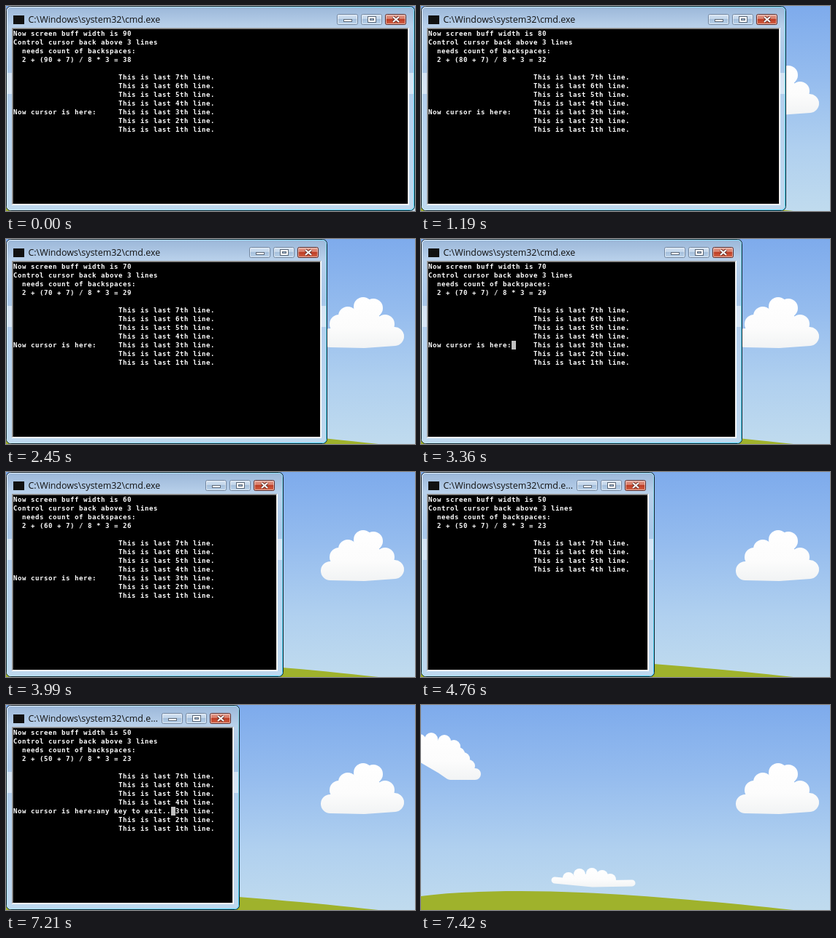
Animation of 560 by 282 pixels, one loop 8190 ms. Source, as an HTML page with a canvas:

```html
<!DOCTYPE html>
<html lang="en">
<head>
<meta charset="utf-8">
<title>Console cursor</title>
<style>
html, body { margin: 0; width: 100%; height: 100%; overflow: hidden; background: #000; }
canvas { display: block; }
</style>
</head>
<body>
<canvas id="stage" width="560" height="282"></canvas>
<script>
const ctx = document.getElementById('stage').getContext('2d');
const W = 560, H = 282, LOOP = 8190, CLOSE = 7420;
const TICK = 70, RUN = 17 * TICK, BLINK = 175;
const firstBlink = [140, 175, 280, 245, 245, 175]; // per run, in ms

function vertical(y0, y1, ...stops) {
  const g = ctx.createLinearGradient(0, y0, 0, y1);
  stops.forEach(([at, color]) => g.addColorStop(at, color));
  return g;
}

function rect(x, y, w, h, fill) {
  ctx.fillStyle = fill;
  ctx.fillRect(x, y, w, h);
}

function roundRect(x, y, w, h, r, fill, stroke) {
  ctx.beginPath();
  ctx.roundRect(x, y, w, h, r);
  if (fill) { ctx.fillStyle = fill; ctx.fill(); }
  if (stroke) { ctx.strokeStyle = stroke; ctx.lineWidth = 1; ctx.stroke(); }
}

function path(points) {
  ctx.beginPath();
  points.forEach(([x, y]) => ctx.lineTo(x, y));
}

// Round puffs on top of a thick base line
function cloud(top, bottom, r, puffs, baseR, base) {
  const fill = vertical(top, bottom, [0, '#fff'], [0.6, '#fcfcfc'], [1, '#f1f3f4']);
  ctx.fillStyle = ctx.strokeStyle = fill;
  path([...puffs, ...base]);
  ctx.fill();
  for (const [x, y] of puffs) {
    ctx.beginPath();
    ctx.arc(x, y, r, 0, Math.PI * 2);
    ctx.fill();
  }
  ctx.lineWidth = 2 * baseR;
  ctx.lineCap = ctx.lineJoin = 'round';
  path(base);
  ctx.stroke();
  ctx.lineCap = 'butt';
  ctx.lineJoin = 'miter';
}

function desktop() {
  rect(0, 0, W, H, vertical(0, H, [0, '#7eabec'], [0.35, '#95bcee'], [0.7, '#b0d0ef'], [1, '#c0dbee']));

  cloud(38, 104, 9, [[-2, 49], [14, 47], [32, 50], [45, 57], [51, 67], [58, 74], [65, 84]],
    8, [[74, 95], [40, 95], [27, 86], [-4, 68]]);
  cloud(80, 150, 13, [[456, 117], [468, 106], [489, 93], [503, 95], [519, 117]],
    13, [[532, 134], [490, 137], [444, 136]]);
  cloud(223, 251, 8, [[202, 238], [217, 233], [234, 232], [248, 235], [259, 240]],
    4.5, [[289, 245], [235, 246], [183, 241]]);

  ctx.fillStyle = '#9fb22c';
  ctx.beginPath();
  ctx.moveTo(0, 263);
  ctx.bezierCurveTo(50, 256, 140, 254, 220, 258);
  ctx.bezierCurveTo(310, 262, 420, 272, 510, H);
  ctx.lineTo(0, H);
  ctx.fill();
}

function button(x, fill, edge) {
  roundRect(x + 0.5, 11.5, 28, 14, 2, fill, edge);
  roundRect(x + 1.5, 12.5, 26, 12, 1, null, 'rgba(255,255,255,0.55)');
}

function buttons(w) {
  const glass = vertical(11, 26, [0, '#d8e5f4'], [0.48, '#c0d4e9'], [0.5, '#a5bfdb'], [1, '#bfd7ee']);
  const red = vertical(11, 26, [0, '#e6a698'], [0.48, '#d47460'], [0.5, '#bd3c24'], [1, '#d5694c']);
  const min = w - 107, max = w - 74, close = w - 41;
  button(min, glass, '#70859f');
  button(max, glass, '#70859f');
  button(close, red, '#5b2928');

  rect(min + 9, 18, 12, 4, '#5d6978');
  rect(min + 10, 19, 10, 2, '#fff');

  for (const [dark, light, width] of [['#5d6978', '#69362f', 4], ['#fff', '#fff', 2]]) {
    ctx.lineWidth = width;
    ctx.strokeStyle = dark;
    ctx.strokeRect(max + 11, 16, 8, 5);
    ctx.strokeStyle = light;
    for (const [y0, y1] of [[15, 22], [22, 15]]) {
      path([[close + 11, y0], [close + 19, y1]]);
      ctx.stroke();
    }
  }
}

function windowFrame(w) {
  roundRect(0.5, 0.5, w - 1, H - 1, 6, vertical(0, H,
    [0, '#9ab6d8'], [0.1, '#b8d0ea'], [0.3, '#a9c7e9'], [0.45, '#b4d0ee'], [1, '#bfd9ef']), '#16222c');
  for (const x of [2, w - 8]) rect(x, 92, 6, 29, 'rgba(255,255,255,0.5)');

  const shine = ctx.createLinearGradient(0, 0, w, H);
  shine.addColorStop(0, '#eef7ff');
  shine.addColorStop(0.5, '#a5e6fa');
  shine.addColorStop(1, '#3fd2f4');
  roundRect(1.5, 1.5, w - 3, H - 3, 5, null, shine);

  rect(10, 13, 15, 12, '#111');
  ctx.fillStyle = '#101010';
  ctx.font = '12.4px "Open Sans", "Noto Sans", sans-serif';
  ctx.fillText('C:\\Windows\\system32\\cmd.e' + (w < 380 ? '...' : 'xe'), 30.5, 23);
  buttons(w);

  // Sunken edge: dark at top left, light at bottom right
  rect(8, 30, w - 16, 244, '#fff');
  rect(8, 30, w - 17, 243, '#a0a0a0');
  rect(9, 31, w - 18, 242, '#e3e3e3');
  rect(9, 31, w - 19, 241, '#696969');
  rect(10, 32, w - 20, 240, '#000');
}

function print(text, col, row) {
  ctx.fillText(text, 10 + col * 6, 41 + row * 12);
}

function consoleText(cols, partial, exiting, cursor) {
  const count = 2 + Math.floor((cols + 7) / 8) * 3;
  ctx.fillStyle = '#fff';
  ctx.font = 'bold 9px "DejaVu Sans Mono", "Liberation Mono", monospace';
  ctx.letterSpacing = (6 - ctx.measureText('M').width) + 'px';
  print(`Now screen buff width is ${cols}`, 0, 0);
  print('Control cursor back above 3 lines', 0, 1);
  print('needs count of backspaces:', 2, 2);
  print(`2 + (${cols} + 7) / 8 * 3 = ${count}`, 2, 3);

  for (let n = 7; n >= (partial ? 4 : 1); n--) {
    const covered = exiting && n === 3;
    print(covered ? '3th line.' : `This is last ${n}th line.`, covered ? 37 : 24, 12 - n);
  }
  if (!partial) {
    print('Now cursor is here:' + (exiting ? 'any key to exit..' : ''), 0, 9);
    if (cursor) rect(exiting ? 226 : 124, 140, 6, 12, '#c0c0c0');
  }
  ctx.letterSpacing = '0px';
}

function draw(time) {
  ctx.clearRect(0, 0, W, H);
  desktop();
  if (time >= CLOSE) return;

  const t = Math.floor(time / TICK) * TICK;
  const run = Math.min(5, Math.floor(t / RUN));
  const local = t - run * RUN;
  const cols = Math.max(50, 90 - run * 10);
  const exiting = run === 5;
  const partial = run > 1 && !exiting && local < TICK;
  const blink = Math.floor((local - firstBlink[run]) / BLINK);

  windowFrame(cols * 6 + 20);
  consoleText(cols, partial, exiting, blink >= 0 && blink % 2 === 0);
}

const begin = performance.now();
function tick() {
  draw((performance.now() - begin) % LOOP);
  requestAnimationFrame(tick);
}
tick();
</script>
</body>
</html>
```
